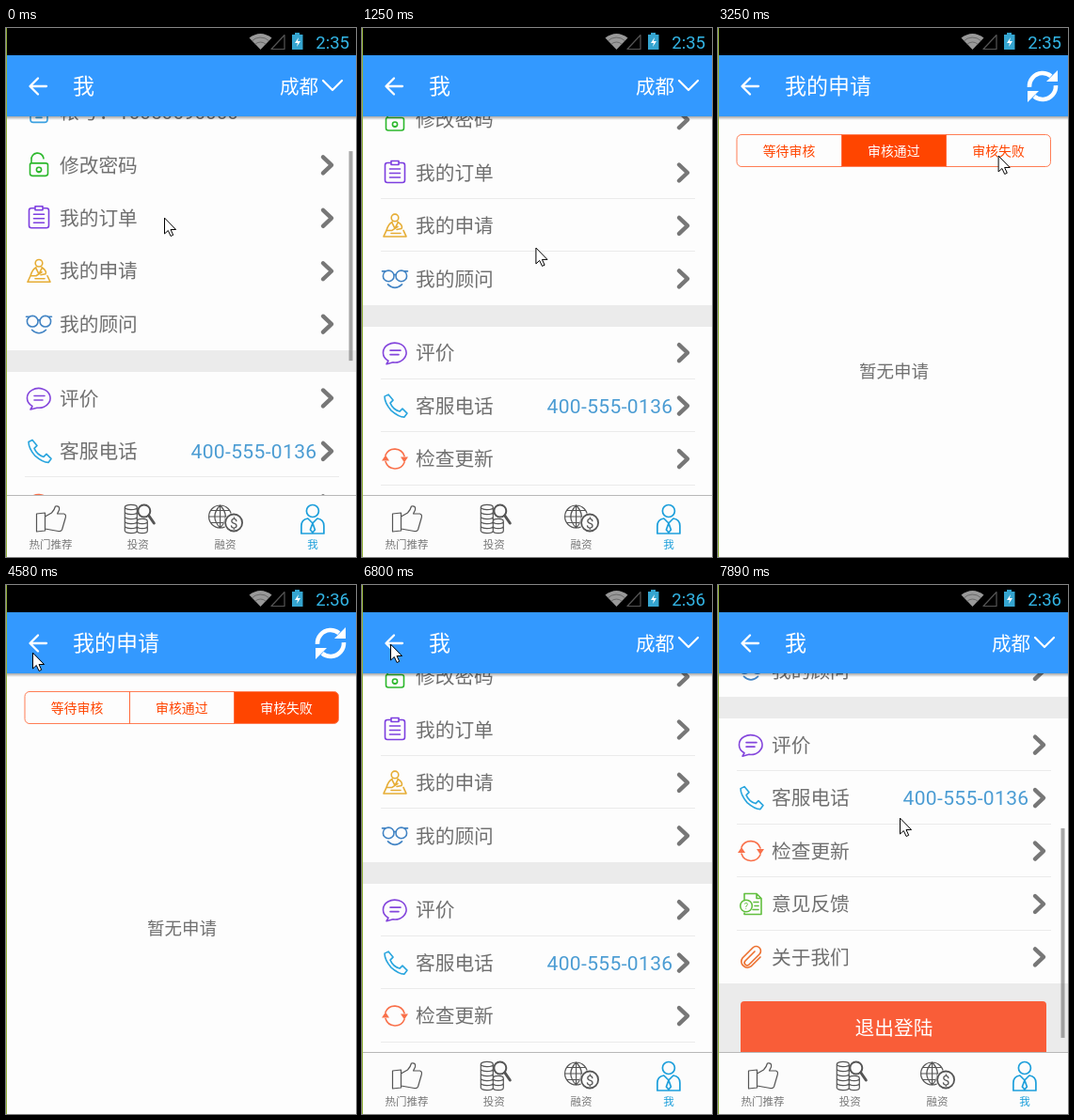
An HTML page with a canvas that plays this animation: 372x563 px, repeating every 8 s.

```html
<!DOCTYPE html>
<html lang="zh-CN">
<head>
<meta charset="utf-8">
<title>App</title>
<style>
html, body { margin: 0; width: 100%; height: 100%; overflow: hidden; background: #fff; }
canvas { display: block; width: 372px; height: 563px; }
</style>
</head>
<body>
<canvas id="stage"></canvas>
<script>
const W = 372, H = 563, LOOP = 8000;
const canvas = document.getElementById('stage');
const ctx = canvas.getContext('2d');
const ratio = window.devicePixelRatio || 1;
canvas.width = W * ratio;
canvas.height = H * ratio;

const SANS = 'Roboto, "Noto Sans CJK SC", "Noto Sans CJK", sans-serif';
const BLUE = '#3399ff', ORANGE = '#ff4500', GREY = '#707070', BAND = '#ebebeb';
const OPEN_AT = 1700, CLOSE_AT = 6800, MINUTE_AT = 4190;
const TAB_W = 111.3;

const clamp = v => Math.min(1, Math.max(0, v));
const progress = (t, from, to) => clamp((t - from) / (to - from));
const mix = (a, b, u) => a + (b - a) * u;

// Pointer stops: arrival time and place; each glide takes at most GLIDE
const GLIDE = 400;
const tabSpot = i => [75 + TAB_W * i, 136];
const STOPS = [
  [0, [168, 202]], [980, [182, 243]], [1530, [190, 213]], [2190, [80, 78]],
  [2730, [186, 126]], [3250, tabSpot(2)], [4580, [28, 72]], [5230, tabSpot(0)],
  [5740, [160, 130]], [6010, [110, 120]], [6250, tabSpot(0)], [6500, [30, 63]],
  [7220, [188, 318]], [7500, [192, 278]], [7890, [193, 248]]
];
const CLICKS = [[0, 0], [3130, 1], [3520, 2], [5234, 0], [5700, 1], [6250, 0]];

const REST = 48.5, END = 224;
const scrollAt = t => t < 4000
  ? REST * (1 - (1 - progress(t, 0, 550)) ** 2)
  : mix(REST, END, progress(t, 7100, 7890) ** 1.5);
const barAlpha = t => t < 4000 ? 1 - progress(t, 550, 840) : Number(t > 7100);

function pointerAt(t) {
  const i = STOPS.findIndex(s => s[0] > t);
  if (i < 0) return STOPS[STOPS.length - 1][1];
  const [left, from] = STOPS[i - 1], [due, to] = STOPS[i];
  const u = progress(t, Math.max(left, due - GLIDE), due);
  return from.map((v, j) => mix(v, to[j], u));
}

const circle = (x, y, r) => `M${x - r} ${y}a${r} ${r} 0 1 0 ${2 * r} 0a${r} ${r} 0 1 0 ${-2 * r} 0`;

const ROWS = [
  { label: '帐号：10050690000', color: '#3aa0e0',
    path: 'M-6 -11H6Q9 -11 9 -8V8Q9 11 6 11H-6Q-9 11 -9 8V-8Q-9 -11 -6 -11M-3 6H3' },
  { label: '修改密码', color: '#2cb82c',
    path: 'M-8 -2V-5.5A6.5 6.5 0 0 1 5 -7M-8 -2H7Q9.5 -2 9.5 0V9Q9.5 11.5 7 11.5H-7Q-9.5 11.5 -9.5 9V0Q-9.5 -2 -8 -2M0 7V8' + circle(0, 5, 2.6) },
  { label: '我的订单', color: '#7d3fe0',
    path: 'M-4 -10.5H-8Q-10.5 -10.5 -10.5 -8V8Q-10.5 10.5 -8 10.5H8Q10.5 10.5 10.5 8V-8Q10.5 -10.5 8 -10.5H4M-4 -12.5H4V-8.5H-4ZM-5.5 -4H5.5M-5.5 0.5H5.5M-5.5 5H5.5' },
  { label: '我的申请', color: '#e6ad35',
    path: circle(0, -8.5, 3.8) + 'M-3 -4Q-7 -2 -9 5M3 -4Q9 0 7 3L2 4M-3 -3L0 3L3 -3M-9 5H-3L3 1M-9 5L-12 11.5H12L9 5M-4 8H6' },
  { label: '我的顾问', color: '#4284c4',
    path: circle(-6.8, -3, 5.8) + circle(6.8, -3, 5.8) + 'M-1 -4Q0 -5 1 -4M-10 -8L-13.5 -8M10 -8L13.5 -8M-7.5 6Q0 13 7.5 6' },
  { label: '评价', color: '#8446dc',
    path: 'M-7 8.6A12.3 10.4 0 1 1 -2 10.2L-9 12ZM-5 -2.5H6M-5 2H4' },
  { label: '客服电话', color: '#29a5de', value: '400-555-0136',
    path: 'M-11 -10L-7 -12L-2 -6L-5 -3Q-2 4 5 6L8 3L13 8L10 12Q4 12 -4 5Q-11 -3 -11 -10Z' },
  { label: '检查更新', color: '#f9704a',
    path: 'M-10 -4A10.7 10.7 0 0 1 10 -3M10 4A10.7 10.7 0 0 1 -10 3',
    solid: 'M-14 2H-6L-10 -4ZM14 -2H6L10 4Z' },
  { label: '意见反馈', color: '#62bf3f',
    path: 'M-7 -5V-11H6L11 -6V11H-7V9M6 -11V-6H11M3 -2H8M4 2H8M2 6H8' + circle(-5, 2, 6.3), mark: '?' },
  { label: '关于我们', color: '#ec6f2d',
    path: 'M4 -6L-6 4a2.7 2.7 0 0 0 4 4L9 -3a4.7 4.7 0 0 0 -7 -7L-9 1a6.5 6.5 0 0 0 9 9L10 0' }
];

// A pile of coins seen from the side
const pile = (x, top, count, w) => Array.from({ length: count }, (_, i) =>
  `M${x} ${top + 5 * i}a${w / 2} 2.6 0 0 0 ${w} 0`).join('') +
  `M${x} ${top}a${w / 2} 2.6 0 0 1 ${w} 0V${top + 5 * (count - 1)}M${x} ${top}V${top + 5 * (count - 1)}`;

const NAV = [
  { label: '热门推荐', path: 'M-15 -6L-6 -7V12L-15 13ZM-6 -3L1 -7Q4 -10 5 -14Q10 -15 9 -10L7 -6H14Q17 -5 15.5 -1L12 11Q11 13 8 12.5L-6 10' },
  { label: '投资', path: pile(-14, -13, 6, 13) + pile(-1, 2, 3, 11),
    bold: circle(6.5, -9, 6.5), handle: 'M11.5 -4L17 4' },
  { label: '融资', path: circle(-5.5, -3, 12) + 'M-5.5 -15V9M-17.5 -3H6.5M-15 -9.5H4M-15 3.5H4M-5.5 -15Q-17 -3 -5.5 9M-5.5 -15Q6 -3 -5.5 9', coin: true },
  { label: '我', path: circle(0, -9, 6.5) + 'M-12 15V7Q-12 0 -5 -1L0 4L5 -1Q12 0 12 7V15ZM0 4L-2.5 11L0 14L2.5 11Z', active: true }
];

function rect(x, y, w, h, color) {
  ctx.fillStyle = color;
  ctx.fillRect(x, y, w, h);
}
function round(x, y, w, h, r) {
  ctx.beginPath();
  ctx.roundRect(x, y, w, h, r);
}
function text(str, x, cy, size, color, align = 'left', spacing = 0) {
  ctx.font = `${size}px ${SANS}`;
  ctx.letterSpacing = `${spacing}px`;
  ctx.textAlign = align;
  ctx.fillStyle = color;
  ctx.fillText(str, x, cy + size * 0.37);
}
function shape(d, x, y, color, width) {
  const p = new Path2D(d);
  ctx.save();
  ctx.translate(x, y);
  ctx.lineCap = ctx.lineJoin = 'round';
  ctx.strokeStyle = ctx.fillStyle = color;
  ctx.lineWidth = width;
  if (width) ctx.stroke(p);
  else ctx.fill(p);
  ctx.restore();
}

function statusBar(t) {
  rect(0, 0, W, 29, '#000');
  shape('M0 0L-12 -12.5Q0 -21.5 12 -12.5Z', 270.5, 23, '#999', 0);
  for (const r of [8, 13]) {
    ctx.strokeStyle = '#555';
    ctx.lineWidth = 0.7;
    ctx.beginPath();
    ctx.arc(270.5, 23, r, -Math.PI * 0.76, -Math.PI * 0.24);
    ctx.stroke();
  }
  shape('M0 0H14V-15Z', 282, 22.5, '#555', 1.2);
  rect(307, 5, 5, 2, '#35a5d0');
  rect(304, 7, 11.5, 16, '#35a5d0');
  shape('M1 -5L-3 1H0L-1 5L3 -1H0Z', 310, 15, '#fff', 0);
  text(t < MINUTE_AT ? '2:35' : '2:36', 365, 15.5, 18.5, '#33b5e5', 'right');
}

function header(title, isList) {
  const shade = ctx.createLinearGradient(0, 94, 0, 98);
  shade.addColorStop(0, 'rgba(0,0,0,.35)');
  shade.addColorStop(1, 'rgba(0,0,0,0)');
  rect(0, 94, W, 4, shade);
  rect(0, 29, W, 65, BLUE);
  shape('M9 0H-8M0 -8.5L-8.5 0L0 8.5', 34, 62, '#fff', 2.3);
  text(title, 71, 61, 23, '#fff');
  if (isList) {
    text('成都', 291, 62, 20.6, '#fff');
    shape('M-10 -5.5L0 4.5L10 -5.5', 347, 61.5, '#fff', 2.2);
    return;
  }
  for (const turn of [0, Math.PI]) {
    ctx.save();
    ctx.translate(345, 62);
    ctx.rotate(turn);
    ctx.strokeStyle = '#fff';
    ctx.lineWidth = 4.6;
    ctx.beginPath();
    ctx.arc(0, 0, 14, Math.PI * 0.98, Math.PI * 1.72);
    ctx.stroke();
    shape('M16 -17V-5H4Z', 0, 0, '#fff', 0);
    ctx.restore();
  }
}

function listRow(row, i, y, line) {
  shape(row.path, 35, y, row.color, 1.6);
  if (row.solid) shape(row.solid, 35, y, row.color, 0);
  if (row.mark) text(row.mark, 30, y + 2, 9, row.color, 'center');
  text(row.label, 57, y, 20.7, GREY);
  if (row.value) text(row.value, 330.5, y, 21, '#4b9cd3', 'right', 0.36);
  if (i) shape('M-4.5 -8.5L4.5 0L-4.5 8.5', 341.5, y, '#777', 4.4);
  if (line) rect(20, Math.floor(y + 27.5), 334, 1, '#ebebeb');
}

function listPage(t) {
  const offset = scrollAt(t);
  const firstLine = t < 120 ? 6 : 2;
  ctx.save();
  ctx.beginPath();
  ctx.rect(0, 94, W, 403);
  ctx.clip();
  rect(0, Math.round(343 - offset), W, 23, BAND);
  rect(0, Math.round(648 - offset), W, 120, BAND);
  ROWS.forEach((row, i) => {
    const y = 89.6 + 56.45 * i + (i > 4 ? 22.3 : 0) - offset;
    listRow(row, i, y, i >= firstLine && i !== 4 && i !== 9);
  });
  round(24, 667 - offset, 325, 57, 4);
  ctx.fillStyle = '#f95d38';
  ctx.fill();
  text('退出登陆', 187, 695 - offset, 20.7, '#fff', 'center');
  ctx.globalAlpha = barAlpha(t);
  rect(364.5, 131 + offset * 0.571, 4, 223, 'rgba(110,110,110,.6)');
  ctx.restore();
  navBar();
  header('我', true);
}

function navBar() {
  rect(0, 497, W, H - 497, '#fcfcfc');
  rect(0, 497, W, 1, '#b8b8b8');
  NAV.forEach((item, i) => {
    const x = 47.5 + 92.8 * i;
    const color = item.active ? '#1d9fdb' : '#555';
    shape(item.path, x, 523, color, item.active ? 1.7 : 1.2);
    if (item.bold) {
      shape(item.bold, x, 523, '#fcfcfc', 0);
      shape(item.bold, x, 523, color, 2);
      shape(item.handle, x, 523, color, 3);
    }
    if (item.coin) {
      shape(circle(9, 3.5, 10.5), x, 523, '#fcfcfc', 0);
      shape(circle(9, 3.5, 9), x, 523, color, 1.8);
      text('$', x + 9, 526.5, 15, color, 'center');
    }
    text(item.label, x, 550, 11.5, item.active ? color : '#777', 'center');
  });
}

function requestPage(t) {
  const active = CLICKS.filter(c => c[0] <= t).pop()[1];
  const edge = i => 20 + TAB_W * i;
  ctx.save();
  round(20, 113.5, 333.5, 34, 5);
  ctx.clip();
  rect(edge(active), 113, TAB_W, 35, ORANGE);
  ctx.restore();
  round(20, 113.5, 333.5, 34, 5);
  ctx.lineWidth = 1;
  ctx.strokeStyle = '#ff7d55';
  ctx.stroke();
  for (const i of [1, 2]) rect(Math.floor(edge(i)), 113, 1, 35, '#ff6a3c');
  ['等待审核', '审核通过', '审核失败'].forEach((label, i) =>
    text(label, 75.5 + TAB_W * i, 131, 13.9, i === active ? '#fff' : ORANGE, 'center'));
  text('暂无申请', 187, 365, 18.5, GREY, 'center');
  header('我的申请', false);
}

function pointer(t) {
  const [x, y] = pointerAt(t);
  const d = 'M0 0V16.5L3.8 13L6.6 19L9.2 17.8L6.5 12H11.7Z';
  shape(d, x + 0.5, y + 0.5, '#fff', 0);
  shape(d, x + 0.5, y + 0.5, '#000', 1);
}

function draw() {
  const t = performance.now() % LOOP;
  ctx.setTransform(ratio, 0, 0, ratio, 0, 0);
  rect(0, 0, W, H, '#fdfdfd');
  if (t > OPEN_AT && t < CLOSE_AT) requestPage(t);
  else listPage(t);
  statusBar(t);
  rect(0, 0, 1, H, '#93b23c');
  pointer(t);
  requestAnimationFrame(draw);
}
draw();
</script>
</body>
</html>
```
